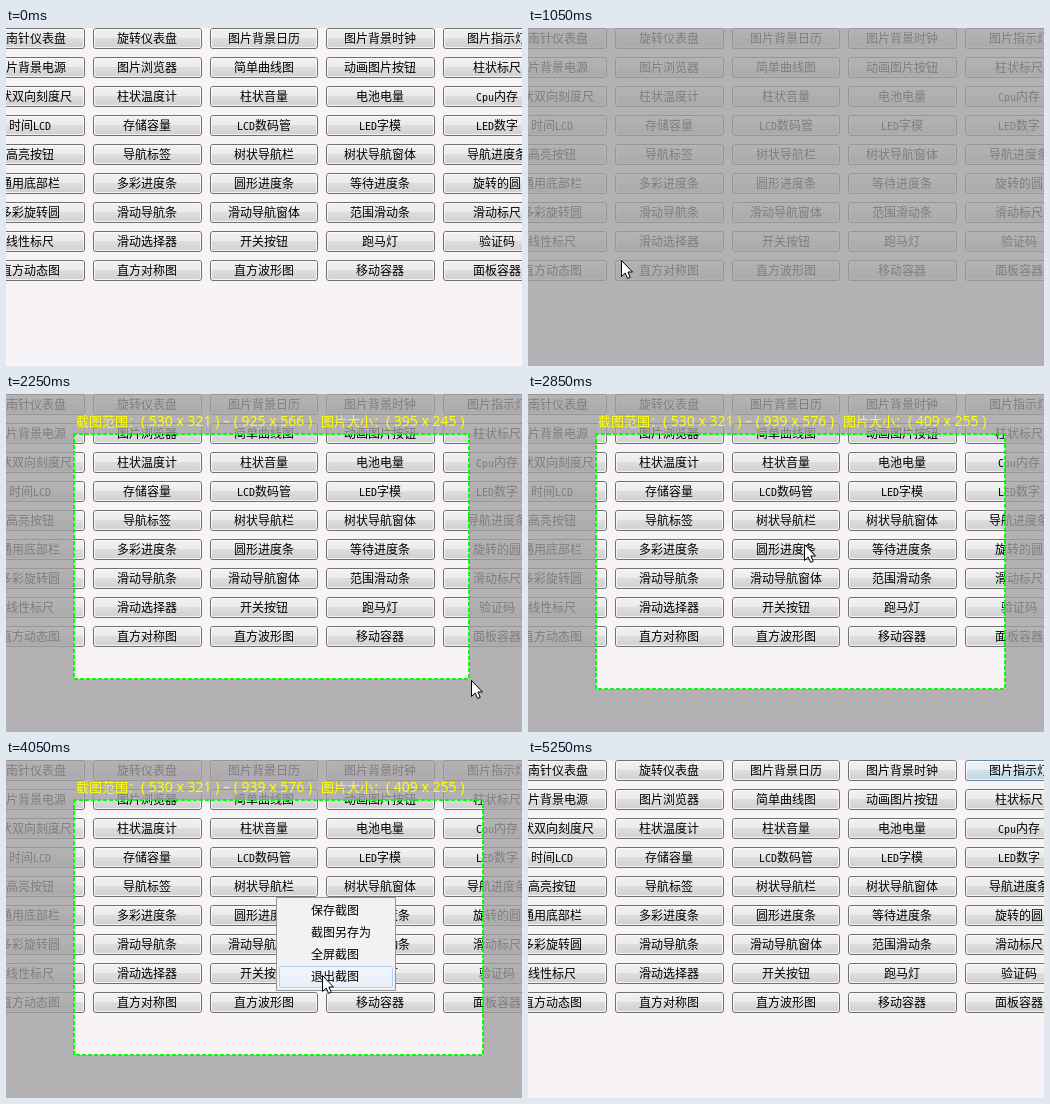
Write an HTML page with a canvas that moves like this. It is 516 by 338 pixels and loops after 5400 ms.

```html
<!DOCTYPE html>
<html lang="zh-CN">
<head>
<meta charset="utf-8">
<title>截图</title>
<style>
html, body { margin: 0; width: 100%; height: 100%; overflow: hidden; background: #f7f3f7; }
canvas { display: block; }
</style>
</head>
<body>
<canvas id="stage" width="516" height="338"></canvas>
<script>
const W = 516, H = 338, LOOP = 5400, STEP = 150;
const LEFT = 68, TOP = 40, SCREEN_X = 462, SCREEN_Y = 281;
const ctx = document.getElementById('stage').getContext('2d');
const CJK = '"Noto Sans CJK SC", "Noto Sans CJK JP", "Noto Sans CJK", sans-serif';
const MONO = '"DejaVu Sans Mono", monospace';

const labels = [
  '指南针仪表盘 旋转仪表盘 图片背景日历 图片背景时钟 图片指示灯',
  '图片背景电源 图片浏览器 简单曲线图 动画图片按钮 柱状标尺',
  '柱状双向刻度尺 柱状温度计 柱状音量 电池电量 Cpu内存',
  '时间LCD 存储容量 LCD数码管 LED字模 LED数字',
  '高亮按钮 导航标签 树状导航栏 树状导航窗体 导航进度条',
  '通用底部栏 多彩进度条 圆形进度条 等待进度条 旋转的圆',
  '多彩旋转圆 滑动导航条 滑动导航窗体 范围滑动条 滑动标尺',
  '线性标尺 滑动选择器 开关按钮 跑马灯 验证码',
  '直方动态图 直方对称图 直方波形图 移动容器 面板容器'
].map(row => row.split(' '));
const menuItems = ['保存截图', '截图另存为', '全屏截图', '退出截图'];

const within = (t, from, to) => t >= from && t < to;
const clamp = v => Math.max(0, Math.min(1, v));

// Decelerating move from a to b, at rest before and after.
function glide(t, from, to, a, b) {
  const p = clamp((t - from) / (to - from)), eased = p * (2 - p);
  return a.map((v, i) => Math.round(v + (b[i] - v) * eased));
}

function selectionAt(t) {
  if (!within(t, 1950, 4200)) return null;
  const nearlyDone = [395, 245];
  return t < 2250
    ? glide(t, 1950, 2250, [144, 89], nearlyDone)
    : glide(t, 2250, 2400, nearlyDone, [409, 255]);
}

function cursorAt(t) {
  if (within(t, 300, 450)) return [203, 270];
  if (within(t, 1050, 1950)) return glide(t, 1050, 1650, [93, 232], [LEFT - 1, TOP - 1]);
  if (within(t, 1950, 2400)) {
    // The pointer runs ahead of the dragged corner.
    const [w, h] = selectionAt(t), [dx, dy] = glide(t, 1950, 2250, [35, 22], [3, 1]);
    return [LEFT + w - 1 + dx, TOP + h + dy];
  }
  if (within(t, 2400, 3000)) return glide(t, 2400, 2850, [477, 295], [276, 150]);
  if (within(t, 3000, 3900)) return glide(t, 3000, 3150, [259, 126], [270, 137]);
  if (within(t, 3900, 4350)) return glide(t, 3900, 4050, [302, 186], [316, 215]);
  if (within(t, 4650, 5100)) return glide(t, 4650, 4950, [470, 16], [500, 3]);
  return null;
}

const hoverAt = t => t < 4650 ? 0 : Math.min(1, (t - 4500) / 300, 1 - (t - 4950) / 500);

function gradient(y, h, stops) {
  const g = ctx.createLinearGradient(0, y, 0, y + h);
  stops.forEach(([at, color]) => g.addColorStop(at, color));
  return g;
}

function roundBox(x, y, w, h, r, fill, stroke) {
  ctx.beginPath();
  ctx.roundRect(x + 0.5, y + 0.5, w - 1, h - 1, r);
  if (fill) { ctx.fillStyle = fill; ctx.fill(); }
  if (stroke) { ctx.strokeStyle = stroke; ctx.lineWidth = 1; ctx.stroke(); }
}

function text(str, x, y, font, color = '#000') {
  ctx.font = font;
  ctx.fillStyle = color;
  ctx.fillText(str, x, y);
}

// Latin glyphs are half as wide as the Chinese ones.
function buttonLabel(str, centerX, baseline) {
  const isLatin = s => s.charCodeAt(0) < 128;
  const runs = str.match(/[ -~]+|[^ -~]+/g);
  const width = s => s.length * (isLatin(s) ? 6 : 12);
  let x = Math.round(centerX - runs.reduce((sum, s) => sum + width(s), 0) / 2);
  for (const run of runs) {
    text(run, x, baseline, (isLatin(run) ? '10px ' + MONO : '12px ' + CJK));
    x += width(run);
  }
}

function buttonFace(x, y, w, [a, b, c, d], border) {
  roundBox(x, y, w, 21, 2.5, gradient(y, 21, [[0, a], [0.48, b], [0.5, c], [1, d]]), border);
}

function drawButtons(hover) {
  labels.forEach((row, r) => row.forEach((label, c) => {
    const x = Math.round(116.6 * c - 29.6), y = 29 * r;
    const w = Math.round(116.6 * c + 79) - x;
    buttonFace(x, y, w, ['#f2f2f2', '#ebebeb', '#dddddd', '#cfcfcf'], '#707070');
    if (hover && r === 0 && c === 4) {
      ctx.globalAlpha = hover;
      buttonFace(x, y, w, ['#eaf6fd', '#d9f0fc', '#bee6fd', '#a7d9f5'], '#3c7fb1');
      ctx.globalAlpha = 1;
    }
    roundBox(x + 1, y + 1, w - 2, 19, 1.5, null, 'rgba(255,255,255,.75)');
    buttonLabel(label, x + 53.5, y + 15);
  }));
}

function drawDim(selection) {
  ctx.beginPath();
  ctx.rect(0, 0, W, H);
  if (selection) ctx.rect(LEFT, TOP, ...selection);
  ctx.fillStyle = 'rgba(162,160,162,.784)';
  ctx.fill('evenodd');
}

function drawSelection([w, h]) {
  ctx.strokeStyle = '#0f0';
  ctx.lineWidth = 2;
  ctx.setLineDash([4, 2]);
  ctx.lineDashOffset = 1;
  ctx.strokeRect(LEFT, TOP, w, h);
  ctx.setLineDash([]);

  const x = LEFT + SCREEN_X, y = TOP + SCREEN_Y;
  const latin = '14px "Noto Sans", sans-serif', han = '13px ' + CJK;
  text('截图范围：', 70, 32, han, '#ff0');
  text(`( ${x} x ${y} ) – ( ${x + w} x ${y + h} )`, 135, 32, latin, '#ff0');
  text('图片大小：', 315, 32, han, '#ff0');
  text(`( ${w} x ${h} )`, 380, 32, latin, '#ff0');
}

function drawMenu(alpha, active) {
  ctx.globalAlpha = alpha;
  roundBox(270, 137, 120, 94, 0, '#f3f2f3', '#979797');
  menuItems.forEach((label, i) => {
    const y = 140 + 22 * i;
    if (i === active) {
      roundBox(273, y, 114, 22, 2, gradient(y, 22, [[0, '#f3f6fa'], [1, '#e6eff9']]), '#aecff7');
    }
    text(label, 305, y + 15, '12px ' + CJK);
  });
  ctx.globalAlpha = 1;
}

function drawCursor([x, y]) {
  const arrow = new Path2D('M.5 .5V16.5L4.2 13L6.6 18.4L9.2 17.3L6.9 12H11.5Z');
  ctx.save();
  ctx.translate(x, y);
  ctx.fillStyle = '#fff';
  ctx.fill(arrow);
  ctx.strokeStyle = '#000';
  ctx.lineWidth = 1;
  ctx.stroke(arrow);
  ctx.restore();
}

function draw(t) {
  const selection = selectionAt(t), cursor = cursorAt(t);
  ctx.fillStyle = '#f7f3f7';
  ctx.fillRect(0, 0, W, H);
  drawButtons(hoverAt(t));
  if (within(t, 1050, 4200)) drawDim(selection);
  if (selection) drawSelection(selection);
  if (within(t, 3300, 4200)) {
    const active = t < 3900 ? -1 : Math.floor((cursor[1] - 140) / 22);
    drawMenu(clamp((t - 3150) / 300), active);
  }
  if (cursor) drawCursor(cursor);
}

const start = performance.now();
function tick() {
  const t = (performance.now() - start) % LOOP;
  draw(Math.floor(t / STEP) * STEP);
  requestAnimationFrame(tick);
}
tick();
</script>
</body>
</html>
```
